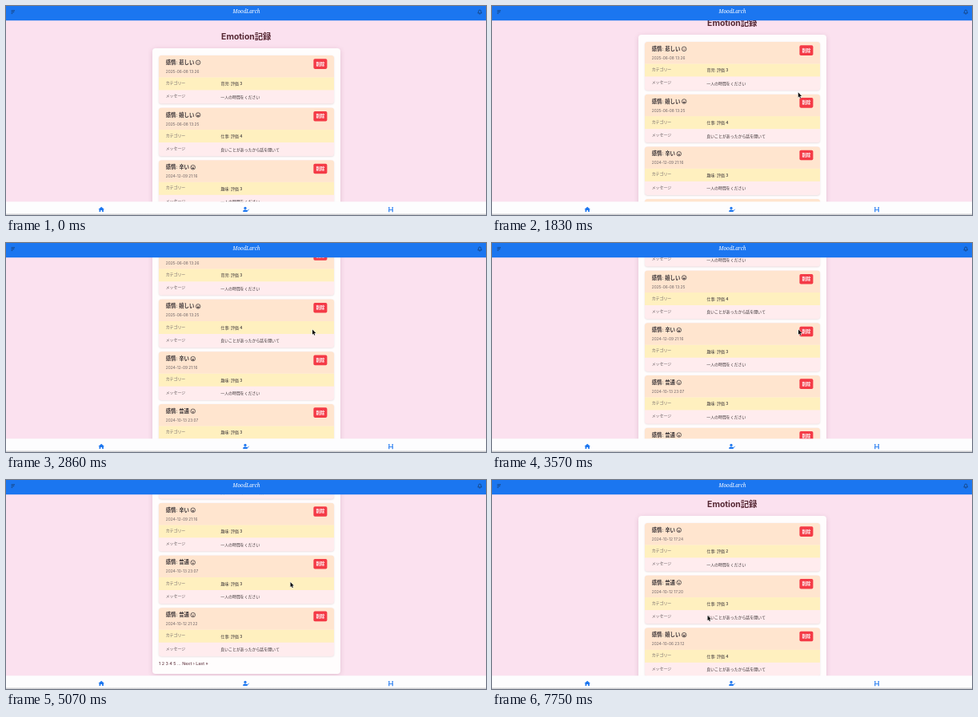
An HTML page with a canvas for the animation above (7.8 s loop, 600 px wide and 262 px high).

```html
<!DOCTYPE html>
<html lang="ja">
<head>
<meta charset="utf-8">
<title>Emotion記録</title>
<style>
html, body { margin: 0; width: 100%; height: 100%; overflow: hidden; background: #fbe1ef; }
canvas { display: block; width: 600px; height: 262px; }
</style>
</head>
<body>
<canvas id="stage"></canvas>
<script>
const W = 600, H = 262, LOOP = 7800, PAGE_TURN = 5850;
const PITCH = 65.7, BLUE = '#1b76f0', INK = '#3a3437';
const SANS = 'Inter, "Noto Sans CJK JP", "Noto Sans CJK", sans-serif';
const canvas = document.getElementById('stage');
const dpr = window.devicePixelRatio || 1;
canvas.width = W * dpr;
canvas.height = H * dpr;
const c = canvas.getContext('2d');

const ALONE = '一人の時間をください';
const LISTEN = '良いことがあったから話を聞いて';
const pages = [
  [
    ['悲しい', '2025-06-08 13:26', '育児: 評価 3', ALONE],
    ['嬉しい', '2025-06-08 13:25', '仕事: 評価 4', LISTEN],
    ['辛い', '2024-12-09 21:16', '趣味: 評価 3', ALONE],
    ['普通', '2024-10-13 23:07', '趣味: 評価 3', ALONE],
    ['普通', '2024-10-12 21:22', '仕事: 評価 3', LISTEN]
  ],
  [
    ['辛い', '2024-10-12 17:24', '仕事: 評価 2', ALONE],
    ['普通', '2024-10-12 17:20', '仕事: 評価 3', LISTEN],
    ['嬉しい', '2024-10-06 23:12', '仕事: 評価 4', LISTEN]
  ]
];

// Keys are [time, value]
const scrollKeys = [[0, 0], [820, 0], [1110, 4], [1600, 12], [2230, 28], [2900, 59],
  [3570, 93], [4200, 140], [4700, 164.5], [PAGE_TURN, 164.5]];
const scrollKeys2 = [[PAGE_TURN, 0], [7230, 0], [7500, 3.5], [7750, 8], [7800, 8]];
const cursorX = [[0, 604], [60, 604], [780, 382], [1110, 382], [2230, 383], [4020, 383],
  [4800, 355.5], [5080, 355.5], [5560, 229], [6720, 229], [7260, 269.5], [7800, 269.5]];
const cursorY = [[0, 160], [60, 160], [780, 108], [1110, 108], [2230, 108.5], [4020, 108.5],
  [4800, 128], [5080, 128], [5560, 228], [6720, 228], [7260, 170], [7800, 170]];

// Monotone cubic interpolation: smooth, never overshoots
function track(keys, t) {
  const last = keys.length - 1;
  if (t <= keys[0][0]) return keys[0][1];
  if (t >= keys[last][0]) return keys[last][1];
  let i = 0;
  while (t >= keys[i + 1][0]) i++;
  const slope = k => (keys[k + 1][1] - keys[k][1]) / (keys[k + 1][0] - keys[k][0]);
  const tangent = k => {
    if (k === 0 || k === last) return 0;
    const a = slope(k - 1), b = slope(k);
    return a * b <= 0 ? 0 : 2 * a * b / (a + b);
  };
  const h = keys[i + 1][0] - keys[i][0], u = (t - keys[i][0]) / h, v = 1 - u;
  return keys[i][1] * (1 + 2 * u) * v * v + h * tangent(i) * u * v * v
    + keys[i + 1][1] * u * u * (3 - 2 * u) - h * tangent(i + 1) * u * u * v;
}

function text(s, x, y, size, color, weight = 400, align = 'left') {
  c.font = `${weight} ${size}px ${SANS}`;
  c.fillStyle = color;
  c.textAlign = align;
  c.textBaseline = 'alphabetic';
  c.fillText(s, x, y + size * 0.37);
}

function rect(x, y, w, h, color) {
  c.fillStyle = color;
  c.fillRect(x, y, w, h);
}

function rounded(x, y, w, h, r) {
  c.beginPath();
  c.roundRect(x, y, w, h, r);
}

function poly(points, color) {
  c.beginPath();
  points.forEach(([x, y]) => c.lineTo(x, y));
  c.closePath();
  c.fillStyle = color;
  c.fill();
}

function dot(x, y, r, color) {
  c.beginPath();
  c.arc(x, y, r, 0, 7);
  c.fillStyle = color;
  c.fill();
}

function line(points, color, width) {
  c.beginPath();
  points.forEach(([x, y]) => c.lineTo(x, y));
  c.strokeStyle = color;
  c.lineWidth = width;
  c.stroke();
}

function shadow(color, blur, dy) {
  c.shadowColor = color;
  c.shadowBlur = blur * dpr;
  c.shadowOffsetY = dy * dpr;
}

function face(x, y, mood) {
  c.strokeStyle = INK;
  c.lineWidth = 0.75;
  c.beginPath();
  c.arc(x, y, 2.8, 0, 7);
  c.stroke();
  dot(x - 1, y - 0.7, 0.45, INK);
  dot(x + 1, y - 0.7, 0.45, INK);
  c.beginPath();
  if (mood === '悲しい') {
    c.arc(x, y + 2, 1.2, Math.PI * 1.15, Math.PI * 1.85);
    c.lineWidth = 0.55;
    c.stroke();
  } else {
    if (mood === '嬉しい') c.arc(x, y + 0.4, 1.6, 0, Math.PI);
    else if (mood === '辛い') c.arc(x, y + 1.8, 1.4, Math.PI, 0);
    else c.ellipse(x, y + 1.1, 0.9, 0.8, 0, 0, 7);
    c.fillStyle = INK;
    c.fill();
  }
}

function card(y, [mood, date, rating, message]) {
  const x = 191, w = 219, h = 60.7;
  c.save();
  shadow('rgba(90,40,50,.16)', 2, 0.6);
  rounded(x, y, w, h, 3.5);
  c.fillStyle = '#ffecee';
  c.fill();
  c.restore();
  c.save();
  rounded(x, y, w, h, 3.5);
  c.clip();
  rect(x, y, w, 27.5, '#ffe5cf');
  rect(x, y + 27.5, w, 16, '#fff0bf');
  c.restore();

  const head = '感情: ' + mood;
  text(head, 199.7, y + 8.6, 6.4, INK, 600);
  face(199.7 + c.measureText(head).width + 4.8, y + 8.9, mood);
  text(date, 199.7, y + 20.2, 4.8, '#6a6265');
  text('カテゴリー', 199.7, y + 34.2, 4.93, '#6a6265');
  text(rating, 268.5, y + 35.7, 4.93, INK, 500);
  text('メッセージ', 199.7, y + 50.6, 4.93, '#6a6265');
  text(message, 268.3, y + 52.1, 4.93, INK, 500);

  rounded(384.4, y + 4.4, 17, 12.6, 1.8);
  c.fillStyle = '#f43a46';
  c.fill();
  text('削除', 392.9, y + 10.7, 5.4, '#fff', 700, 'center');
}

function content(page, scroll) {
  text('Emotion記録', 300.3, 38.6 - scroll, 10.4, '#552733', 700, 'center');
  c.save();
  shadow('rgba(110,50,80,.18)', 6, 1.5);
  rounded(183, 53 - scroll, 235, 354.5, 4);
  c.fillStyle = '#fffdfd';
  c.fill();
  c.restore();
  pages[page].forEach((entry, i) => card(61.9 + i * PITCH - scroll, entry));
  if (page === 0) text('1 2 3 4 5 … Next › Last »', 191, 394.5 - scroll, 5.4, '#552733');
}

function header() {
  rect(0, 0, W, 18.2, BLUE);
  c.font = 'italic 6.3px "Noto Serif", "Liberation Serif", serif';
  c.fillStyle = '#fff';
  c.textAlign = 'center';
  c.fillText('MoodLarch', 300.5, 9.3);
  const dark = '#163866';
  line([[6.5, 5.8], [11, 5.8]], dark, 0.8);
  line([[6.5, 7.6], [10.2, 7.6]], dark, 0.7);
  line([[6.5, 9.4], [8.4, 9.4]], dark, 0.7);
  c.beginPath();
  c.moveTo(589.8, 9);
  c.quadraticCurveTo(590.6, 8, 590.6, 6.6);
  c.arc(592.2, 6.6, 1.6, Math.PI, 0);
  c.quadraticCurveTo(593.8, 8, 594.6, 9);
  c.closePath();
  c.strokeStyle = dark;
  c.lineWidth = 0.7;
  c.stroke();
  dot(592.2, 9.9, 0.6, dark);
}

function footer() {
  rect(0, 245.3, W, H - 245.3, '#fdfdfe');
  const edge = c.createLinearGradient(0, 259.5, 0, H);
  edge.addColorStop(0, 'rgba(190,190,194,0)');
  edge.addColorStop(1, 'rgba(190,190,194,.9)');
  rect(0, 259.5, W, 2.5, edge);

  poly([[119.2, 251.7], [122.9, 255.1], [121.9, 255.1], [121.9, 258], [120.1, 258],
    [120.1, 256], [118.3, 256], [118.3, 258], [116.5, 258], [116.5, 255.1], [115.5, 255.1]], BLUE);

  dot(299, 253.3, 1.6, BLUE);
  rounded(296.2, 255.4, 5.6, 2.7, [2, 2, 0.4, 0.4]);
  c.fill();
  line([[300.6, 256], [301.6, 257], [303.6, 254.8]], BLUE, 0.9);

  for (const side of [-1, 1]) {
    const x = 481 + side * 2.2;
    dot(x, 252.8, 0.9, BLUE);
    line([[x, 254.2], [x, 258.2]], BLUE, 1.2);
    line([[x, 254.4], [481 + side * 0.6, 255.6]], BLUE, 0.8);
  }
  line([[479.8, 255.6], [482.2, 255.6]], BLUE, 0.8);
}

function cursor(x, y) {
  c.save();
  c.translate(x, y);
  c.beginPath();
  [[0, 0], [0, 6.3], [1.4, 5], [2.4, 7.3], [3.4, 6.8], [2.4, 4.6], [4.4, 4.6]]
    .forEach(([px, py]) => c.lineTo(px, py));
  c.closePath();
  c.lineJoin = 'round';
  c.strokeStyle = '#fff';
  c.lineWidth = 1;
  c.stroke();
  c.fillStyle = '#111';
  c.fill();
  c.restore();
}

function draw(now) {
  const t = now % LOOP;
  const page = t < PAGE_TURN ? 0 : 1;
  c.setTransform(dpr, 0, 0, dpr, 0, 0);
  rect(0, 0, W, H, '#fbe1ef');
  content(page, track(page ? scrollKeys2 : scrollKeys, t));
  header();
  footer();
  cursor(track(cursorX, t), track(cursorY, t));
  requestAnimationFrame(draw);
}
requestAnimationFrame(draw);
</script>
</body>
</html>
```
